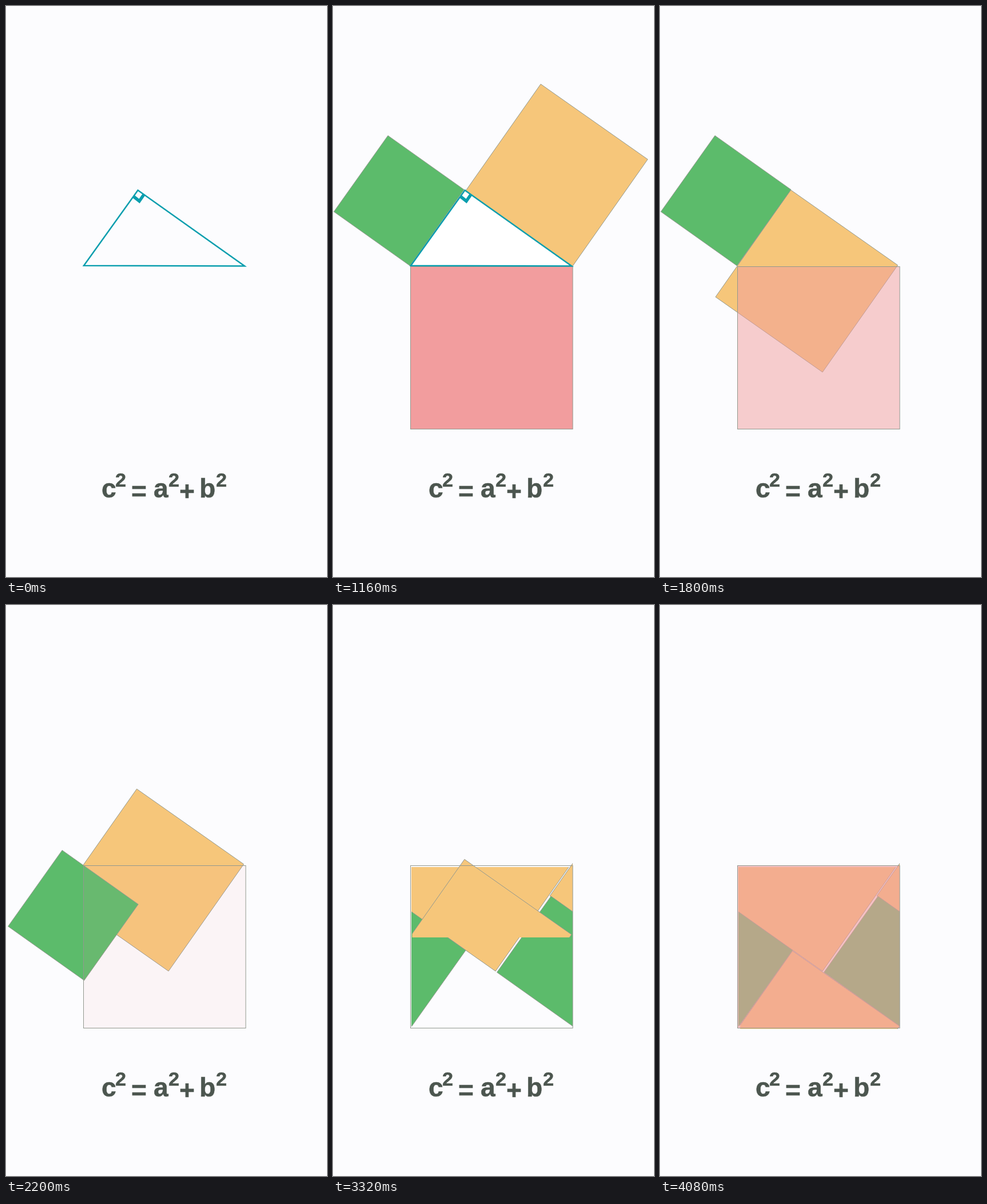
Recreate the animation shown at these times as an HTML page with a canvas. Size 561 by 998 pixels, loop 4160 ms.

```html
<!DOCTYPE html>
<html lang="en">
<head>
<meta charset="utf-8">
<title>Squares on a right triangle</title>
<style>
  html, body { margin: 0; width: 100%; height: 100%; overflow: hidden; background: #fcfcfe; }
  canvas, svg { position: absolute; left: 0; top: 0; width: 561px; height: 998px; }
  text {
    font: bold 46px "Liberation Sans", Arial, sans-serif;
    fill: #4c564f; stroke: #4c564f; stroke-width: 0.6px;
  }
  .sup { font-size: 34px; }
</style>
</head>
<body>
<canvas id="stage" width="561" height="998"></canvas>
<svg viewBox="0 0 561 998">
  <text x="167" y="859">c</text><text class="sup" x="191" y="840">2</text>
  <text x="219" y="864">=</text>
  <text x="258" y="859">a</text><text class="sup" x="284" y="840">2</text>
  <text x="303" y="864">+</text>
  <text x="338" y="859">b</text><text class="sup" x="367" y="840">2</text>
</svg>
<script>
const ctx = document.getElementById('stage').getContext('2d');
const LOOP = 4160, STEP = 80, W = 561, H = 998;
const BACK = '#fcfcfe', TEAL = '#0a9eae', EDGE = '#92988f', RED = '#f29d9e';

// Squares: a corner, one side, and the way they slide into place.
const YELLOW = { at: [363, 136.5], side: [187, 131.5], slide: [-134.5, 185], fill: '#f6c67a' };
const GREEN = { at: [96, 226.5], side: [133, 94.5], slide: [3, 282.5], fill: '#5cbb6b' };
const BIG = [135.5, 455.5, 283.5, 284];
const TRIANGLE = [[230.5, 322], [417, 454.4], [136, 453.8]];
const MARK = [[223, 333], [233, 341], [241, 329.5]];

// The pieces are cut along the left and top sides of the big square.
const CUT_X = 137, CUT_Y = 458;
const LEFT = [-W, 0, CUT_X + W, H];
const RIGHT = [CUT_X, 0, W, H];
const TOP = [CUT_X, 0, W, CUT_Y];
const BOTTOM = [CUT_X, CUT_Y, W, H];

// Progress from 0 to 1, advancing in steps; the first step shows at `from`.
function ramp(t, from, to, power = 1) {
  if (t < from) return 0;
  if (t >= to) return 1;
  const held = Math.floor((t - from) / STEP) * STEP;
  return ((held + STEP) / (to - from + STEP)) ** power;
}

function trace(points, closed = true) {
  ctx.beginPath();
  points.forEach(p => ctx.lineTo(...p));
  if (closed) ctx.closePath();
}

function corners({ at, side: [u, v], slide }, p) {
  const x = at[0] + slide[0] * p, y = at[1] + slide[1] * p;
  return [[x, y], [x + u, y + v], [x + u - v, y + v + u], [x - v, y + u]];
}

// Draws the part of a square inside a window, moved by dx, dy.
function piece(shape, p, window, dx = 0, dy = 0) {
  ctx.save();
  ctx.translate(dx, dy);
  ctx.beginPath();
  ctx.rect(...window);
  ctx.clip();
  trace(corners(shape, p));
  ctx.fillStyle = shape.fill;
  ctx.fill();
  ctx.strokeStyle = EDGE;
  ctx.lineWidth = 1;
  ctx.stroke();
  ctx.restore();
}

function drawTriangle() {
  ctx.strokeStyle = TEAL;
  ctx.lineWidth = 2.5;
  trace(TRIANGLE);
  ctx.stroke();
  ctx.lineWidth = 5.5;
  trace(MARK, false);
  ctx.stroke();
}

function draw(t) {
  const shown = ramp(t, 560, 920);
  const outline = 1 - ramp(t, 1360, 1600);
  const red = shown * (1 - ramp(t, 1360, 2240)) + ramp(t, 3920, LOOP, 1.8);
  const yellow = ramp(t, 1360, 1800);
  const green = ramp(t, 1920, 2240, 1.5);
  const dx = Math.round(282 * ramp(t, 2600, 3000, 0.9));
  const fall = ramp(t, 3160, 3560, 1.2);
  const dy = Math.round(283 * fall);

  ctx.globalAlpha = 1;
  ctx.fillStyle = BACK;
  ctx.fillRect(0, 0, W, H);

  ctx.globalAlpha = shown * outline;
  ctx.fillStyle = '#fff';
  trace(TRIANGLE);
  ctx.fill();

  ctx.globalAlpha = shown;
  const top = () => piece(YELLOW, yellow, TOP, 3 * fall, dy);
  if (!dy) top();
  piece(YELLOW, yellow, BOTTOM);
  piece(YELLOW, yellow, LEFT, dx);
  piece(GREEN, green, RIGHT);
  piece(GREEN, green, LEFT, dx);
  if (dy) top();

  ctx.globalAlpha = red;
  ctx.fillStyle = RED;
  ctx.fillRect(...BIG);
  ctx.globalAlpha = shown;
  ctx.strokeStyle = EDGE;
  ctx.lineWidth = 1;
  ctx.strokeRect(...BIG);

  ctx.globalAlpha = outline;
  drawTriangle();
}

const start = performance.now();
function tick() {
  draw((performance.now() - start) % LOOP);
  requestAnimationFrame(tick);
}
tick();
</script>
</body>
</html>
```
